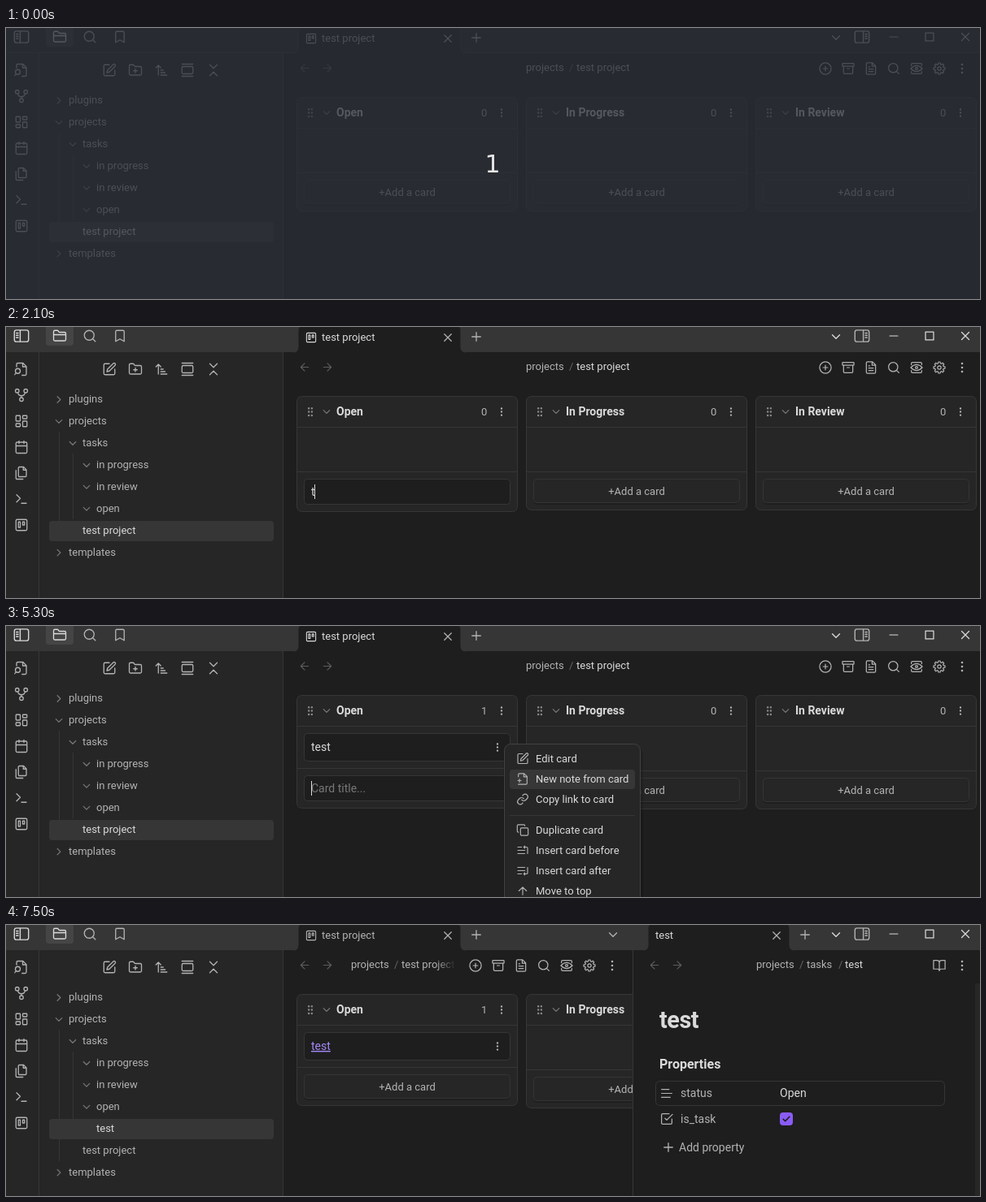
These frames come from a looping animation (1197 px wide and 334 px high, 8000 ms). An HTML page:

```html
<!DOCTYPE html>
<html lang="en">
<head>
<meta charset="utf-8">
<title>Kanban board demo</title>
<style>
html, body { margin: 0; width: 100%; height: 100%; overflow: hidden; background: #1e1e1e; }
svg { display: block; font: 13px Roboto, sans-serif; white-space: pre; }
</style>
</head>
<body>
<svg id="stage" width="1197" height="334" viewBox="0 0 1197 334"></svg>
<script>
const LOOP = 8000;
const MAIN = '#1e1e1e', SIDE = '#262626', LINE = '#363636';
const TEXT = '#dadada', MUTED = '#b3b3b3', FAINT = '#666';
const ACCENT = '#8a5cf5', HOVER = '#a68af9';

const disc = (x, y, r) => `M${x - r} ${y}a${r} ${r} 0 1 0 ${2 * r} 0a${r} ${r} 0 1 0 ${-2 * r} 0`;
const box = (x, y, w, h, r = 2) =>
  `M${x + r} ${y}h${w - 2 * r}a${r} ${r} 0 0 1 ${r} ${r}v${h - 2 * r}a${r} ${r} 0 0 1 ${-r} ${r}h${2 * r - w}` +
  `a${r} ${r} 0 0 1 ${-r} ${-r}v${2 * r - h}a${r} ${r} 0 0 1 ${r} ${-r}z`;
const dots = (xs, ys) => xs.flatMap(x => ys.map(y => disc(x, y, 1))).join('');
const sheet = 'M14.5 2H6a2 2 0 0 0-2 2v16a2 2 0 0 0 2 2h12a2 2 0 0 0 2-2V7.5zM14 2v6h6';
const folder = 'M4 20h16a2 2 0 0 0 2-2V8a2 2 0 0 0-2-2h-7.9a2 2 0 0 1-1.7-.9L9.6 3.9A2 2 0 0 0 7.9 3H4a2 2 0 0 0-2 2v13a2 2 0 0 0 2 2z';
const gear = Array.from({ length: 8 }, (_, i) => {
  const p = (r, d) => {
    const a = (i + d) * Math.PI / 4;
    return `${(12 + r * Math.cos(a)).toFixed(2)} ${(12 + r * Math.sin(a)).toFixed(2)}`;
  };
  return `${i ? 'L' : 'M'}${p(10, -.2)}L${p(10, .2)}L${p(7.6, .32)}L${p(7.6, .68)}`;
}).join('') + 'z';

// Stroke icons on a 24 unit grid
const ICONS = {
  panelLeft: box(1, 3, 22, 18, 3) + 'M10 3v18M4 7.5h3M4 11h3M4 14.5h3',
  panelRight: box(1, 3, 22, 18, 3) + 'M14 3v18M17 7.5h3M17 11h3M17 14.5h3',
  folder: folder + 'M2 10h20',
  folderPlus: folder + 'M12 10v6M9 13h6',
  search: disc(11, 11, 8) + 'M21 21l-4.3-4.3',
  bookmark: 'M19 21l-7-4-7 4V5a2 2 0 0 1 2-2h10a2 2 0 0 1 2 2z',
  fileSearch: 'M4 8V4a2 2 0 0 1 2-2h8.5L20 7.5V20a2 2 0 0 1-2 2h-5M14 2v6h6' + disc(6, 15, 4) + 'M3 18l-2 3',
  graph: disc(5, 5, 3) + disc(19, 5, 3) + disc(12, 19, 3) + 'M6 8c1 4 3 5 6 5s5-1 6-5M12 13v3',
  dashboard: box(3, 3, 7, 9, 1) + box(14, 3, 7, 5, 1) + box(14, 12, 7, 9, 1) + box(3, 16, 7, 5, 1),
  calendar: box(3, 4, 18, 18) + 'M16 2v4M8 2v4M3 10h18',
  files: 'M15.5 2H8.6A1.6 1.6 0 0 0 7 3.6v12.8A1.6 1.6 0 0 0 8.6 18h9.8a1.6 1.6 0 0 0 1.6-1.6V6.5zM15 2v5h5M3 7.6v12.8A1.6 1.6 0 0 0 4.6 22h9.8',
  terminal: 'M4 17l6-6-6-6M12 19h8',
  board: box(3, 3, 18, 18) + 'M7 7h3v9h-3zM14 7h3v5h-3z',
  edit: 'M12 3H5a2 2 0 0 0-2 2v14a2 2 0 0 0 2 2h14a2 2 0 0 0 2-2v-7M18.4 2.6a2.1 2.1 0 0 1 3 3L12 15l-4 1 1-4z',
  sort: 'M3 8l4-4 4 4M7 4v16M11 12h4M11 16h7M11 20h10',
  gallery: 'M3 2h18M3 22h18' + box(3, 6, 18, 12),
  collapse: 'M6 21l6-6 6 6M6 3l6 6 6-6',
  x: 'M18 6L6 18M6 6l12 12',
  plus: 'M5 12h14M12 5v14',
  minus: 'M5 12h14',
  square: box(5, 5, 14, 14, 0),
  down: 'M6 9l6 6 6-6',
  right: 'M9 18l6-6-6-6',
  back: 'M12 19l-7-7 7-7M19 12H5',
  next: 'M12 5l7 7-7 7M5 12h14',
  up: 'M5 12l7-7 7 7M12 19V5',
  circlePlus: disc(12, 12, 10) + 'M8 12h8M12 8v8',
  archive: box(2, 3, 20, 5, 1) + 'M4 8v11a2 2 0 0 0 2 2h12a2 2 0 0 0 2-2V8M10 12h4',
  fileText: sheet + 'M16 13H8M16 17H8M10 9H8',
  filePlus: 'M4 8V4a2 2 0 0 1 2-2h8.5L20 7.5V20a2 2 0 0 1-2 2H4M14 2v6h6M3 15h6M6 12v6',
  view: 'M3 7V5a2 2 0 0 1 2-2h14a2 2 0 0 1 2 2v2M3 17v2a2 2 0 0 0 2 2h14a2 2 0 0 0 2-2v-2M2 12q10-10 20 0q-10 10-20 0' + disc(12, 12, 2),
  gear: gear + disc(12, 12, 3),
  more: dots([12], [5, 12, 19]),
  grip: dots([9, 15], [5, 12, 19]),
  link: 'M10 13a5 5 0 0 0 7.5.5l3-3a5 5 0 0 0-7-7L11.800 5.200M14 11a5 5 0 0 0-7.500-.5l-3 3a5 5 0 0 0 7 7l1.700-1.700',
  copy: box(8, 8, 14, 14) + 'M4 16a2 2 0 0 1-2-2V4a2 2 0 0 1 2-2h10a2 2 0 0 1 2 2',
  listStart: 'M16 12H3M16 18H3M10 6H3M21 18V8a2 2 0 0 0-2-2h-5M16 8l-2-2 2-2',
  listEnd: 'M16 12H3M16 6H3M10 18H3M21 6v10a2 2 0 0 1-2 2h-5M16 16l-2 2 2 2',
  text: 'M3 5h13M3 12h18M3 19h15',
  check: 'M9 11l3 3L22 4M21 12v7a2 2 0 0 1-2 2H5a2 2 0 0 1-2-2V5a2 2 0 0 1 2-2h11',
  tick: 'M5 12.500l4.500 4.500L19 7',
  book: 'M2 3h6a4 4 0 0 1 4 4v14a3 3 0 0 0-3-3H2zM22 3h-6a4 4 0 0 0-4 4v14a3 3 0 0 1 3-3h7z',
};

const icon = (name, x, y, size = 18, color = MUTED, weight = 1.75) =>
  `<path d="${ICONS[name]}" transform="translate(${x - size / 2} ${y - size / 2}) scale(${size / 24})" fill="none" ` +
  `stroke="${color}" stroke-width="${weight}" stroke-linecap="round" stroke-linejoin="round"/>`;
const icons = (names, x, y, step, size, color) =>
  names.split(' ').map((n, i) => icon(n, x + i * step, y, size, color)).join('');
const text = (s, x, y, color = MUTED, size = 13, more = '') =>
  `<text x="${x}" y="${y}" fill="${color}" font-size="${size}" ${more}>${s}</text>`;
const rect = (x, y, w, h, fill, r = 0, more = '') =>
  `<rect x="${x}" y="${y}" width="${w}" height="${h}" rx="${r}" fill="${fill}" ${more}/>`;
const framed = (x, y, w, h, fill, r, color = LINE) =>
  rect(x + .5, y + .5, w - 1, h - 1, fill, r, `stroke="${color}"`);
const hline = (x, y, w) => rect(x, y, w, 1, LINE);
const vline = (x, y, h) => rect(x, y, 1, h, LINE);
const bold = 'font-weight="600"';

function tab(x, w, title, color, hasIcon) {
  return `<path d="M${x - 6} 31q6 0 6-6V4q0-5 5-5h${w - 10}q5 0 5 5v21q0 6 6 6" fill="${MAIN}" stroke="${LINE}"/>` +
    (hasIcon ? icon('board', x + 16, 13, 15, color) : '') +
    text(title, x + (hasIcon ? 29 : 9), 17, color) +
    icon('x', x + w - 16, 13, 17, MUTED) + icon('plus', x + w + 19, 12, 18);
}

function sidebar(s) {
  const top = s.focused ? TEXT : MUTED;
  let out = rect(0, 31, 341, 303, SIDE) + vline(40, 31, 303) + vline(340, 31, 303);
  out += icon('panelLeft', 19, 11, 19, top) + rect(49, -4, 34, 27, s.focused ? '#454545' : LINE, 4);
  out += icon('folder', 66, 11, 18, TEXT) + icon('search', 103, 11) + icon('bookmark', 140, 11);
  'fileSearch graph dashboard calendar files terminal board'.split(' ')
    .forEach((n, i) => { out += icon(n, 19, 52 + 32 * i); });
  out += icons('edit folderPlus sort gallery collapse', 127, 52, 32);

  const rows = [['plugins', 0, 'right'], ['projects', 0, 'down'], ['tasks', 1, 'down'],
    ['in progress', 2, 'down'], ['in review', 2, 'down'], ['open', 2, 'down'],
    ...(s.split ? [['test', 2, '']] : []), ['test project', 1, ''], ['templates', 0, 'right']];
  out += rect(53, 239, 276, 25, '#363636', 4);
  out += vline(65, 129, s.split ? 162 : 135) + vline(82, 156, s.split ? 108 : 81);
  rows.forEach(([name, depth, arrow], i) => {
    const y = 89 + 26.950 * i, x = 65 + 17 * depth;
    if (arrow) out += icon(arrow, x, y + .5, 15, '#777', 2);
    out += text(name, x + 12, Math.round(y + 4), i === 6 ? TEXT : MUTED);
  });
  return out;
}

function button(x, y, look) {
  const purple = look === 'purple';
  const edge = { purple: '#b49bfa', raised: '#474747' }[look] || '#343434';
  return rect(x, y + 2, 254, 30, '#000', 5, 'opacity=".18"') +
    framed(x, y, 254, 30, purple ? HOVER : look === 'raised' ? '#232323' : SIDE, 4, edge) +
    text('+Add a card', x + 127, y + 20, purple ? '#fff' : MUTED, 13, 'text-anchor="middle"');
}

function input(x, y, s) {
  return framed(x, y, 254, 32, MAIN, 4) +
    (s.typed ? text(s.typed, x + 9, y + 21, TEXT, 14) : text('Card title...', x + 9, y + 21, '#777', 14)) +
    (s.caret ? rect(x + 9 + [0, 4, 12, 19, 23][s.typed.length], y + 7, 1, 18, TEXT) : '');
}

function card(x, s) {
  return framed(x, 132, 254, 35, MAIN, 4) +
    (s.split && s.linked
      ? text('test', x + 9, 154, HOVER, 14, 'text-decoration="underline"')
      : s.named ? text('test', x + 9, 154, TEXT, 14) : '') +
    (s.cardHover ? rect(x + 228, 139, 21, 21, '#333', 4) : '') + icon('more', x + 238, 149.500, 14, MUTED, 2);
}

function column(x, title, s, first, look) {
  const filled = first && s.card, form = first && s.form;
  const base = filled ? 175 : 178;
  const bottom = form ? base + 50 : filled ? 223 : 226;
  return framed(x, 85, 272, bottom - 85, SIDE, 6) + hline(x, 123, 272) + hline(x, base, 272) +
    icon('grip', x + 17, 104.500, 15, '#888', 2) + icon('down', x + 37, 104.500, 15, '#777', 2) +
    text(title, x + 49, 109, TEXT, 14, bold) + text(filled ? 1 : 0, x + 227, 109) +
    icon('more', x + 252, 104.500, 14, MUTED, 2) +
    (filled ? card(x + 9, s) : '') +
    (form ? input(x + 9, base + 9, s) : button(x + 9, base + 9, look));
}

function board(s) {
  return column(357, 'Open', s, true, s.openLook) +
    column(639, 'In Progress', s, false, s.nextLook) +
    column(921, 'In Review', s, false);
}

const arrows = x => icons('back next', x, 49.500, 28, 16, '#5c5c5c');
const slash = x => text('/', x, 53, FAINT);

function boardPane(s) {
  const x = s.split ? 424 : 639;
  return tab(359, 200, 'test project', s.focused && !s.split ? TEXT : MUTED, true) + arrows(367) +
    text('projects', x, 53) + slash(x + 53) +
    text('test project', x + 62, 53, s.split ? 'url(#fade)' : s.focused ? TEXT : MUTED) +
    icons('circlePlus archive fileText search view gear more', s.split ? 577 : 1007, 50, 28, 17) +
    (s.split ? icon('down', 746, 12) : '') + board(s);
}

function notePane(s) {
  let out = rect(771, 31, 426, 303, MAIN) + vline(770, 0, 334) + tab(789, 174, 'test', TEXT) + arrows(797) +
    text('projects', 922, 53) + slash(975) + text('tasks', 984, 53) + slash(1023) + text('test', 1031, 53, TEXT) +
    icons('book more', 1147, 50, 28, 17);
  if (!s.linked) return out;
  out += text('test', 803, 127, TEXT, 28.800, 'font-weight="700" letter-spacing="-.43"');
  if (!s.props) return out;
  return out + rect(1191, 72, 6, 262, '#272727') + text('Properties', 803, 177, TEXT, 16, bold) +
    `<g opacity="${s.rowHover}">${framed(798, 192, 356, 31, 'none', 5)}</g>` +
    icon('text', 812, 207.500, 17) + text('status', 829, 212, MUTED, 14) + text('Open', 951, 212, TEXT, 14) +
    icon('check', 812, 239, 17) + text('is_task', 829, 244, MUTED, 14) +
    rect(951, 231, 16, 16, ACCENT, 4) + icon('tick', 959, 239, 13, MAIN, 3) +
    icon('plus', 814, 274, 18) + text('Add property', 827, 279, MUTED, 14);
}

function menu(active) {
  const items = [['edit', 'Edit card', 163], ['filePlus', 'New note from card', 188],
    ['link', 'Copy link to card', 213], ['copy', 'Duplicate card', 251], ['listStart', 'Insert card before', 276],
    ['listEnd', 'Insert card after', 301], ['up', 'Move to top', 326]];
  return rect(611, 148, 172, 200, '#000', 10, 'opacity=".16"') + framed(612, 145, 168, 210, SIDE, 8, '#424242') +
    hline(619, 233, 154) +
    items.map(([name, label, y], i) =>
      (i === active ? rect(619, y - 11, 154, 24, '#373737', 4) : '') +
      icon(name, 635, y + .5, 16, MUTED) + text(label, 651, y + 5, TEXT)).join('');
}

function stateAt(t) {
  const during = (a, b) => t >= a && t < b;
  const split = t >= 6300;
  return {
    countdown: t < 100, focused: t >= 1000, split,
    form: during(1100, 6200), card: t >= 2900, named: t >= 3000,
    linked: t >= 6400, props: t >= 6500,
    typed: t < 2900 ? 'test'.slice(0, [2100, 2200, 2400, 2500].filter(k => t >= k).length) : '',
    caret: !during(1700, 2100) && !during(3500, 4100) && !during(4700, 5300) && t < 5900,
    cardHover: during(4300, 4900),
    menu: during(4500, 6100), active: t < 5000 ? -1 : t < 5200 ? 0 : 1,
    openLook: during(700, 1100) ? 'purple' : '',
    nextLook: during(6200, 6300) ? 'raised' : during(6300, 7100) ? 'purple' : '',
    rowHover: Math.min(1, Math.max(0, Math.floor((t - 7100) / 100) / 4)),
  };
}

function draw(s) {
  const bar = s.focused ? LINE : SIDE, top = s.focused ? TEXT : MUTED;
  return '<defs><linearGradient id="fade" gradientUnits="userSpaceOnUse" x1="528" x2="553">' +
    `<stop stop-color="${MUTED}"/><stop offset="1" stop-color="${MUTED}" stop-opacity="0"/></linearGradient></defs>` +
    rect(0, 0, 1197, 334, MAIN) + rect(0, 0, 1197, 31, bar) + hline(0, 30, 1197) +
    sidebar(s) + boardPane(s) + (s.split ? notePane(s) : '') +
    icon('down', 1020, 12, 18, top) + icon('panelRight', 1052, 11, 19, MUTED) +
    icon('minus', 1091, 11, 17, top) + icon('square', 1135, 11, 17, top) + icon('x', 1179, 11, 18, top) +
    (s.menu ? menu(s.active) : '') +
    (s.countdown ? rect(0, 0, 1197, 334, '#282d35', 0, 'opacity=".75"') +
      text('1', 598, 178, '#e6e6e6', 30, 'text-anchor="middle" font-family="DejaVu Sans, sans-serif"') : '');
}

const stage = document.getElementById('stage');
let shown = '';
function tick() {
  const state = stateAt(performance.now() % LOOP), key = JSON.stringify(state);
  if (key !== shown) {
    shown = key;
    stage.innerHTML = draw(state);
  }
  requestAnimationFrame(tick);
}
tick();
</script>
</body>
</html>
```
